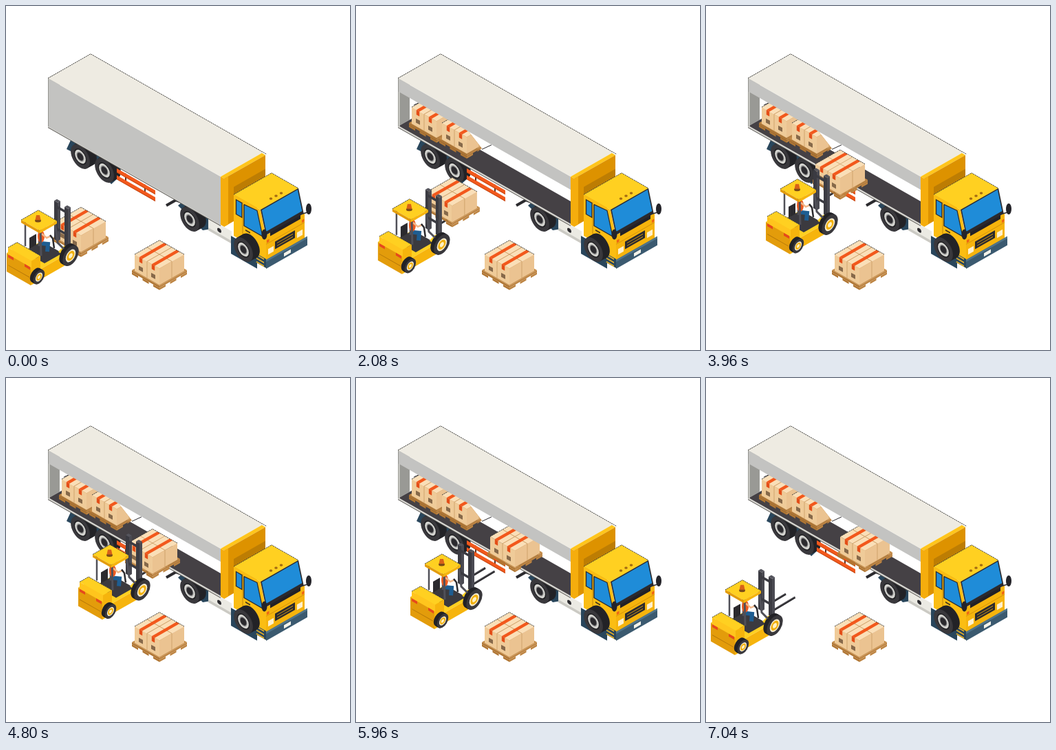
An HTML page with a canvas that plays this animation: 500 px wide and 500 px high, repeating every 7360 ms.

```html
<!DOCTYPE html>
<html lang="en">
<head>
<meta charset="utf-8">
<title>Loading a truck</title>
<style>
  html, body { margin: 0; width: 100%; height: 100%; overflow: hidden; background: #fff; }
  canvas { display: block; width: 100vw; height: 100vh; object-fit: contain; }
</style>
</head>
<body>
<canvas id="stage" width="500" height="500"></canvas>
<script>
const ctx = document.getElementById('stage').getContext('2d');
const LOOP = 7360, STEP = 40;
const K = 0.57;        // slope of the isometric axes
const CLIMB = 0.525;   // slope of the forklift's path
const DARK = '#2b2a2e', NAVY = '#29465c', ORANGE = '#f2581c', BLUE = '#1f8cd8';
const YELLOW = ['#ffd021', '#e39c0b', '#f6b40d'];   // top, left face, right face
const WOOD = ['#c58c48', '#b07633', '#bd8442'];
const CARTON = ['#fadfb8', '#efcb99', '#ebc391'];
const STEEL = ['#55555d', '#3b3b42', '#4a4a52'];

function within(matrix, draw) {
  ctx.save();
  ctx.transform(...matrix);
  draw();
  ctx.restore();
}
const move = (x, y, draw) => within([1, 0, 0, 1, x, y], draw);
// Planes: x runs down-right on left faces, up-right on right faces.
const left = (x, y, draw) => within([1, K, 0, 1, x, y], draw);
const right = (x, y, draw) => within([1, -K, 0, 1, x, y], draw);
const flat = (x, y, draw) => within([1, K, 1, -K, x, y], draw);

function rect(color, x, y, w, h) {
  ctx.fillStyle = color;
  ctx.fillRect(x, y, w, h);
}
function trace(pts) {
  ctx.beginPath();
  for (let i = 0; i < pts.length; i += 2) ctx.lineTo(pts[i], pts[i + 1]);
}
function poly(color, ...pts) {
  trace(pts);
  ctx.fillStyle = color;
  ctx.fill();
}
function line(color, width, ...pts) {
  trace(pts);
  ctx.strokeStyle = color;
  ctx.lineWidth = width;
  ctx.stroke();
}
function oval(color, x, y, rx, ry = rx) {
  ctx.beginPath();
  ctx.ellipse(x, y, rx, ry, 0, 0, Math.PI * 2);
  ctx.fillStyle = color;
  ctx.fill();
}

// Block standing on its left bottom corner: a down-right, b up-right, h high.
function block([top, near, far], x, y, a, b, h) {
  flat(x, y - h, () => rect(top, 0, 0, a, b));
  left(x, y, () => rect(near, 0, -h, a, h));
  right(x + a, y + a * K, () => rect(far, 0, -h, b, h));
}
// Dotted edge along the far side of a block's top.
function rim(x, y, a, b) {
  ctx.setLineDash([2, 1]);
  line('#3c3b37', 1, x, y, x + b, y - b * K, x + a + b, y + (a - b) * K);
  ctx.setLineDash([]);
}

// Side is 1 for wheels facing left, -1 for right; rings go [color, size].
function wheel(x, y, r, side, depth, rings) {
  for (let i = depth; i >= 0; i--) {
    within([0.866, 0.5 * side, 0, 1, x + i * side, y - i * K], () => oval(i ? '#232327' : '#39383c', 0, 0, r));
  }
  within([0.866, 0.5 * side, 0, 1, x, y], () => rings.forEach(([color, size]) => oval(color, 0, 0, r * size)));
}
const truckWheel = (x, y) =>
  wheel(x, y, 16, 1, 10, [['#1f1f22', 0.66], ['#d4d4d0', 0.57], ['#8d8d8d', 0.4], [DARK, 0.32]]);
const liftWheel = (x, y, r) =>
  wheel(x, y, r, -1, 5, [['#f7edd2', 0.62], ['#f2b10f', 0.48], ['#fff1c4', 0.25]]);

function pallet(x, y) {
  const size = 36, tall = 24, base = size + 4;
  block(WOOD, x - 4, y + 2, base, base, 3);
  for (let i = 0; i < 3; i++) {
    left(x - 4, y + 2, () => rect(WOOD[1], i * 15.5, 0, 9, 3));
    right(x - 4 + base, y + 2 + base * K, () => rect(WOOD[2], i * 15.5, 0, 9, 3));
  }
  block(CARTON, x, y, size, size, tall);
  flat(x, y - tall, () => {
    rect('#c99b63', 17.6, 0, 0.8, size);
    rect('#c99b63', 0, 17.6, size, 0.8);
    for (const a of [9, 27]) rect(ORANGE, a - 2.2, 0, 4.4, size);
  });
  left(x, y, () => {
    rect('#c99b63', 17.6, -tall, 0.8, tall);
    for (const a of [9, 27]) {
      rect('#e44e18', a - 2.2, -tall, 4.4, 7);
      rect('#86694a', a - 3, -11, 6, 6);
    }
  });
  right(x + size, y + size * K, () => rect('#c99b63', 17.6, -tall, 0.8, tall));
  rim(x, y - tall, size, size);
}

function chassis() {
  poly(NAVY, 88, 208, 94, 195, 130, 215, 165, 236, 165, 248, 153, 259, 128, 228);
  truckWheel(108, 219);
  truckWheel(143, 239);
  left(161, 236, () => {
    for (const x of [12, 40]) rect('#5b3022', x, 0, 2, 15);
    for (const y of [0, 10]) {
      rect(ORANGE, 0, y, 56, 6);
      rect('#b8420f', 0, y + 5.2, 56, 0.8);
    }
  });
  line(DARK, 4, 233, 290, 247, 282, 258, 286);
  poly(NAVY, 250, 290, 262, 280, 300, 302, 298, 324, 286, 326);
  truckWheel(267, 310);
  left(294, 308, () => {
    rect('#ebeae3', 0, 0, 34, 18);
    rect('#cbcac4', 0, 14, 34, 4);
    oval(DARK, 16, 9, 3);
  });
}

function interior() {
  left(61, 175, () => rect('#fff', 0, -70, 251, 70));
  right(61, 175, () => rect('#999995', 0, -70, 17, 70));
  flat(61, 175, () => rect('#454145', 0, 0, 251, 30));
  ctx.save();
  trace([75, 130, 140, 160, 165, 184, 183, 207, 160, 224, 75, 182]);
  ctx.clip();
  for (const i of [0, 1]) pallet(81 + i * 44, 171 + i * 23);
  ctx.restore();
  for (const x of [84, 183]) line(DARK, 1, x, 144 + (x - 84) * 0.65, x + 14, 137.5 + (x - 84) * 0.65);
  left(61, 175, () => {
    rect('#d9d8d3', 0, -1.5, 251, 3);
    rect('#55534f', 0, 1, 251, 1);
    rect('#d6d5d0', 0, -70, 2.5, 70);
  });
}

function shell(drop) {
  left(61, 105, () => rect('#c3c3c1', 0, 0, 251, drop));
  flat(61, 105, () => rect('#eeebe2', 0, 0, 251, 62));
  rim(61, 105, 256, 62);
  line('#8a8983', 0.8, 61.5, 105, 61.5, 175);
  block(['#ffc51c', '#f5ad0d', '#dd9200'], 312, 318, 5, 60, 70);
  right(317, 321, () => rect('#f5ad0d', 0, -70, 6, 70));
  right(331, 274, () => rect('#bd7d03', 0, -11, 46, 11));
}

function cabSide() {
  const paint = '#fbbd13';
  rect(paint, 0, 0, 39, 60);
  poly(paint, 38, 0, 39, 0, 47, 36, 47, 80, 31, 80, 31, 36);
  rect(BLUE, 3.5, 5.5, 8.5, 21);
  ctx.strokeStyle = DARK;
  ctx.lineWidth = 1.4;
  ctx.strokeRect(3.5, 5.5, 8.5, 21);
  poly(BLUE, 15, 6, 34, 4, 42, 37, 15, 37);
  line(DARK, 1.4, 15, 6, 34, 4, 42, 37, 15, 37, 15, 6);
  line('#b57c08', 0.8, 13, 4, 13, 54, 36, 58);
  rect('#3e3520', 17, 41, 7, 2);
  rect(NAVY, 31, 67, 16, 13);
  for (const y of [68, 73, 78]) rect('#e8b129', 33, y, 11, 1.8);
}

function cabFront() {
  rect(YELLOW[2], 0, 0, 56, 37);
  rect('#222126', 6, -3, 44, 8);
  rect('#d08f09', 0, 13, 56, 0.8);
  rect(DARK, 13, 17, 29, 11);
  for (const y of [20, 24]) rect('#c08d18', 16, y, 23, 1.2);
  for (const x of [3, 45]) rect('#fff1cd', x, 22, 8, 8);
  for (const x of [1, 52]) rect('#ed6617', x, 8, 3.5, 4);
  rect('#3b5a70', 0, 36, 60, 13);
  rect('#50748a', 0, 36, 60, 3);
  rect('#f4f2e9', 26, 41, 10, 5);
}

function cab() {
  left(327, 334, () => rect(NAVY, 0, 0, 38, 26));
  left(331, 274, cabSide);
  truckWheel(345, 354);
  flat(331, 274, () => rect(YELLOW[0], 0, 0, 39, 55));
  rim(331, 274, 39, 55);
  right(378, 333, cabFront);
  within([1, -K, 0.21, 1, 370, 296], () => {
    rect(DARK, 0, 0, 55, 37);
    rect(BLUE, 1.5, 1.5, 52, 31);
  });
  for (let i = 0; i < 3; i++) oval('#a36a12', 385 + i * 7.5, 280 - i * 4, 2.3, 1.8);
  line(DARK, 1.5, 431, 302, 438, 300);
  oval('#25242a', 440, 295, 4, 8);
  oval('#25242a', 375.5, 332, 4, 7.5);
}

function forks(lift) {
  for (let i = 0; i < 2; i++) {
    const x = 91 + i * 1.5, y = 347 + i * 12 - lift, reach = 19 + i * 12;
    line(DARK, 3, x, y - 14, x, y, x + reach, y - reach * 0.6);
    line('#66656d', 0.8, x, y - 1, x + reach, y - 1 - reach * 0.6);
  }
}

function driver() {
  right(34, 350, () => rect(DARK, 0, -13, 10, 16));
  line('#1e5d91', 6, 51, 345, 61, 346, 60, 357);
  oval('#ed5b20', 51, 335, 5, 9);
  line('#f0b88b', 2.6, 52, 331, 59, 337, 66, 334);
  oval('#332724', 54, 320, 4, 3);
  oval('#f0b88b', 54.5, 323, 3.5, 4);
  line(DARK, 2.5, 64, 333, 68, 338, 70, 352);
}

function forklift() {
  for (let i = 0; i < 2; i++) {
    block(STEEL, 70 + i * 15, 339 + i * 9, 5, 4, 56);
    left(74, 290 + i * 32, () => rect(STEEL[1], 0, 0, 14, 4));
  }
  // Platform, seat and far posts
  block(YELLOW, 16, 377, 35, 34, 15);
  flat(26, 357, () => rect('#3b3a3f', 0, 0, 30, 26));
  for (const x of [28, 48]) line('#505058', 2.5, x, 324 - x * 0.4, x, 349);
  driver();

  // Counterweight with tail lights
  block(YELLOW, 1, 386, 35, 14, 27);
  block(['#ffd021', '#ffc51d', '#f6b40d'], 3, 361, 34, 13, 10);
  left(1, 386, () => {
    for (const x of [2, 26]) rect('#e6481c', x, -26, 8, 4);
    rect('#b0740a', 2, -11, 31, 0.9);
  });
  rim(3, 351, 34, 13);
  poly(YELLOW[0], 76, 357, 84, 349, 96, 347, 104, 354, 84, 364);
  liftWheel(48, 394, 9.5);
  liftWheel(94, 363, 13.5);

  // Near posts, roof and beacon
  line('#505058', 3, 50, 324, 51, 363);
  line('#505058', 3, 71, 313, 75, 344, 84, 353);
  block(YELLOW, 22, 315, 27, 25, 4);
  rim(22, 311, 27, 25);
  oval('#7c4c17', 46.5, 312, 4.5, 2.5);
  poly('#d86218', 42.5, 311, 44, 304, 49, 304, 50.5, 311);
}

// Straight lines through [time, value] pairs.
function track(t, ...keys) {
  for (let i = 1; i < keys.length; i++) {
    const [t0, from] = keys[i - 1], [t1, to] = keys[i];
    if (t < t1) return from + (to - from) * Math.max(0, (t - t0) / (t1 - t0));
  }
  return keys[keys.length - 1][1];
}

function draw(t) {
  const drop = track(t, [0, 70], [780, 19]);
  const drive = track(t, [1520, 0], [3080, 86], [4440, 86], [5160, 122], [5520, 122], [6680, 6]);
  const lift = track(t, [1040, 0], [3080, 53], [3600, 53], [4440, 18.5]);
  const load = t < 5200 ? drive : 122;

  rect('#fff', 0, 0, 500, 500);
  chassis();
  interior();
  move(drive, -drive * CLIMB, () => forks(lift));
  pallet(73 + load, 337 - load * CLIMB - lift);
  shell(drop);
  cab();
  pallet(187, 385);
  move(drive, -drive * CLIMB, forklift);
}

const start = performance.now();
function tick() {
  const t = (performance.now() - start) % LOOP;
  draw(Math.floor(t / STEP) * STEP);
  requestAnimationFrame(tick);
}
tick();
</script>
</body>
</html>
```
